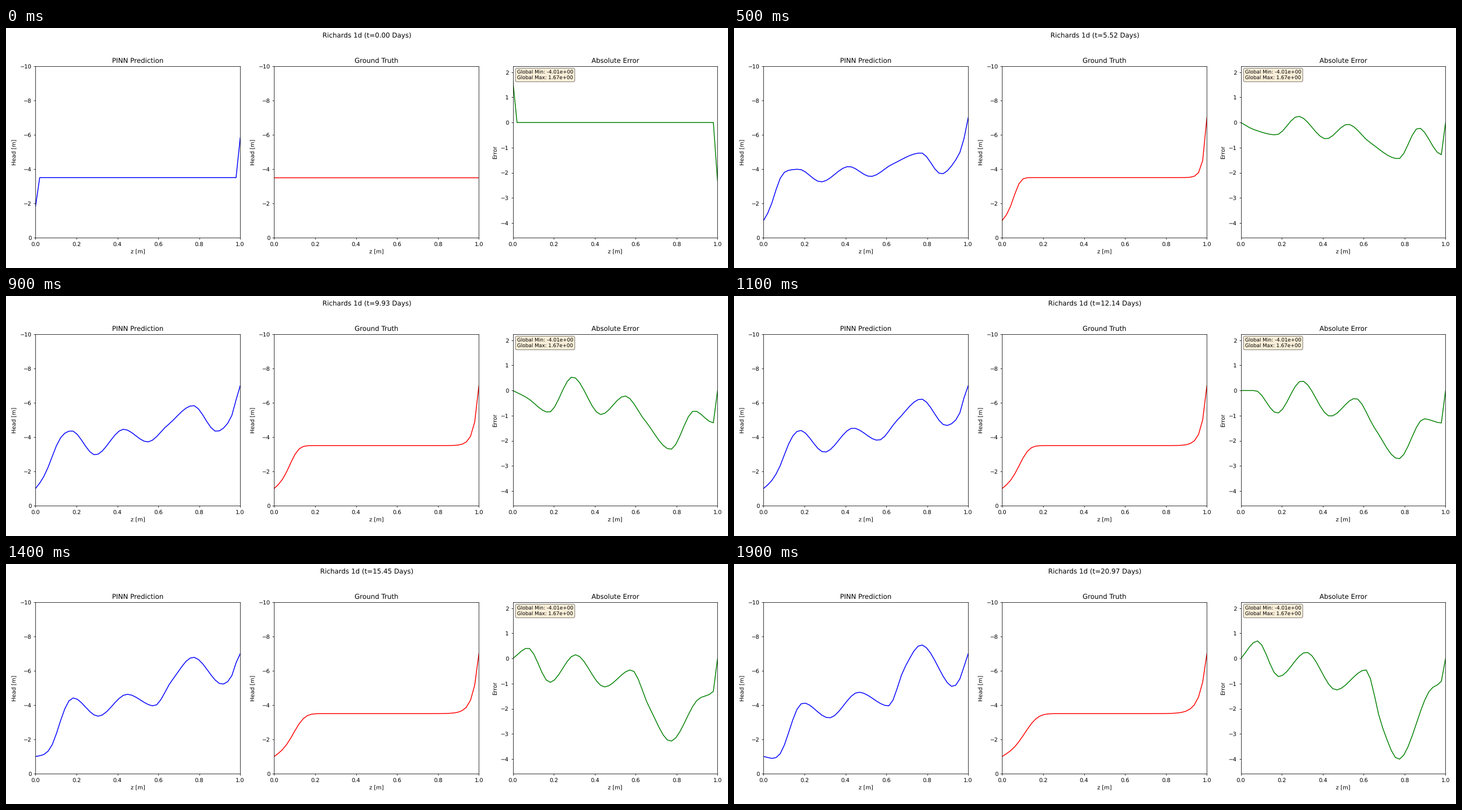
Write a matplotlib script that moves like this. It is 1280 px wide and 427 px high and loops after 2000 ms.

```python
import numpy as np
import matplotlib.pyplot as plt
from matplotlib.animation import FuncAnimation

W, H = 1280, 427
DPI = W / 18
FRAMES = 20
LAST = FRAMES - 1
DAYS_PER_FRAME = 1.1037
Z = np.linspace(0, 1, 50)
REST = 3.5  # initial suction head, as a positive magnitude

# Waves of the prediction around the truth:
# first and last position, then the height at each stage.
STAGES = [0, 3, 8, 14, 19]
WAVES = [
    (0.06, 0.08, 0.18, 0.42, -0.42, -0.70),   # foot
    (0.17, 0.185, 0.25, 0.85, 0.95, 0.72),    # first crest
    (0.275, 0.32, 0.0, -0.62, -0.15, -0.25),  # first dip
    (0.41, 0.465, 0.47, 0.92, 1.13, 1.25),    # second crest
    (0.51, 0.61, 0.0, 0.17, 0.45, 0.45),      # second dip
    (0.62, 0.69, 0.60, 1.05, 1.97, 2.70),     # flank
    (0.77, 0.77, 0.97, 2.15, 3.29, 4.01),     # main crest
    (0.86, 0.93, -0.08, 0.65, 1.60, 1.20),    # third dip
    (0.98, 0.98, 1.28, 1.28, 1.30, 0.90),     # edge
]


def pchip(x, xs, ys):
    """Monotone cubic interpolation."""
    h = np.diff(xs)
    d = np.diff(ys) / h
    m = np.zeros(len(xs))
    same = d[:-1] * d[1:] > 0
    a, b = d[:-1][same], d[1:][same]
    w1, w2 = (2 * h[1:] + h[:-1])[same], (h[1:] + 2 * h[:-1])[same]
    m[1:-1][same] = (w1 + w2) / (w1 / a + w2 / b)
    m[0], m[-1] = d[0], d[-1]
    j = np.clip(np.searchsorted(xs, x, side="right") - 1, 0, len(h) - 1)
    t = (x - xs[j]) / h[j]
    s = t * t * (3 - 2 * t)
    return (ys[j] * (1 - s) + ys[j + 1] * s
            + h[j] * t * (1 - t) * (m[j] * (1 - t) - m[j + 1] * t))


def truth(i):
    """Wetting and drying fronts that spread with the square root of time."""
    if i == 0:
        return np.full_like(Z, -REST)
    scale = 49 * np.sqrt(LAST / i)
    left, right = Z * scale, (1 - Z) * scale
    wet = 2.5 * np.clip(1 - 0.06 * left, 0, 1) * np.exp(-(left / 7.2) ** 3.25)
    dry = 3.5 * np.exp(-0.64 * right)
    return -(REST - wet + dry)


def error(i):
    if i == 0:
        err = np.zeros_like(Z)
        err[0], err[-1] = 1.67, -2.33
        return err
    xs, ys = [0], [0]
    for first, last, *heights in WAVES:
        xs.append(np.interp(i, [3, LAST], [first, last]))
        ys.append(np.interp(i, STAGES, [0, *heights]))
    return -pchip(Z, np.array([*xs, 1]), np.array([*ys, 0]))


plt.rcParams.update({"font.family": "DejaVu Sans", "text.hinting": "none"})
fig = plt.figure(figsize=((W + 1e-6) / DPI, (H + 1e-6) / DPI), dpi=DPI, facecolor="white")


def panel(col, title, ylabel, ylim, color):
    top, bottom = 68.1, 372.9
    ax = fig.add_axes([(52.35 + 423.1 * col) / W, 1 - bottom / H,
                       362.9 / W, (bottom - top) / H])
    ax.set(title=title, xlim=(0, 1), ylim=ylim)
    ax.set_xlabel("z [m]", labelpad=3.5)
    ax.set_ylabel(ylabel, labelpad=4.8)
    line, = ax.plot([], [], color=color)
    return ax, line


_, pred_line = panel(0, "PINN Prediction", "Head [m]", (0, -10), "blue")
_, true_line = panel(1, "Ground Truth", "Head [m]", (0, -10), "red")
lo, hi = -4.01, 1.67
margin = 0.1 * (hi - lo)
err_ax, err_line = panel(2, "Absolute Error", "Error", (lo - margin, hi + margin), "green")
err_ax.text(0.02, 0.98, f"Global Min: {lo:.2e}\nGlobal Max: {hi:.2e}",
            transform=err_ax.transAxes, fontsize=9, va="top",
            bbox=dict(boxstyle="round", facecolor="wheat", alpha=0.5))
heading = fig.suptitle("", fontsize=12, y=0.982)


def draw(i):
    true, err = truth(i), error(i)
    pred_line.set_data(Z, true + err)
    true_line.set_data(Z, true)
    err_line.set_data(Z, err)
    heading.set_text(f"Richards 1d (t={i * DAYS_PER_FRAME:.2f} Days)")
    return pred_line, true_line, err_line, heading


anim = FuncAnimation(fig, draw, frames=FRAMES, interval=100, repeat=True)
plt.show()
```
